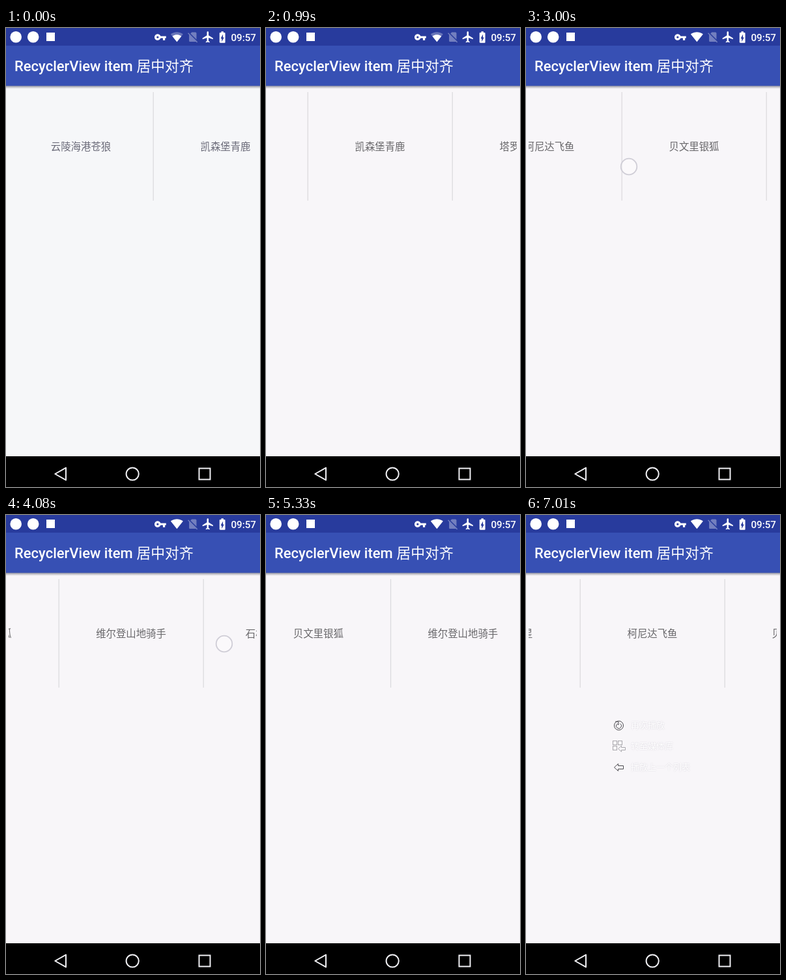
An HTML page with a canvas that plays this animation: 390 by 702 pixels, repeating every 7.11 s.

```html
<!DOCTYPE html>
<html lang="zh-CN">
<head>
<meta charset="utf-8">
<title>RecyclerView item 居中对齐</title>
<style>
  html, body { margin: 0; width: 100%; height: 100%; overflow: hidden; background: #f8f6f9; }
  canvas { display: block; width: 100%; height: 100%; }
</style>
</head>
<body>
<canvas id="stage"></canvas>
<script>
const W = 390, H = 702, LOOP = 7110;
const ITEM = 222, LEFT = 4, RIGHT = 385;
const CJK = '"Noto Sans CJK SC", "Noto Sans CJK", sans-serif';
const TEAMS = ['云陵海港苍狼', '凯森堡青鹿', '塔罗港晨星', '柯尼达飞鱼',
  '贝文里银狐', '维尔登山地骑手', '石桥湾镇雪豹'];

// Scroll moves; touch is the finger's starting point
const MOVES = [
  { start: 300, end: 990, steps: 9, from: 0, to: 162, power: 1.7, touch: [316, 205] },
  { start: 990, end: 1220, steps: 3, from: 162, to: 143, power: 1.7 },
  { start: 1600, end: 2310, steps: 9, from: 143, to: 587, power: 1.68, touch: [325, 205] },
  { start: 2840, end: 3550, steps: 9, from: 587, to: 1031, power: 1.75, touch: [316, 212] },
  { start: 4080, end: 4480, steps: 5, from: 1033, to: 1253, power: 1.7, touch: [335, 197] },
  { start: 4940, end: 5630, steps: 9, from: 1253, to: 809, power: 1.68, touch: [75, 205] },
  { start: 6160, end: 6860, steps: 9, from: 809, to: 587, power: 1.7, touch: [75, 205] }
];

const ICONS = {
  key: 'M12.65 10C11.83 7.67 9.61 6 7 6c-3.31 0-6 2.69-6 6s2.69 6 6 6c2.61 0 4.83-1.67 5.65-4H17v4h4v-4h2v-4H12.65zM7 14c-1.1 0-2-.9-2-2s.9-2 2-2 2 .9 2 2-.9 2-2 2z',
  wifi: 'M12 21.5L23.64 7c-.45-.34-4.93-4-11.64-4C5.28 3 .81 6.66.36 7z',
  wifiLow: 'M3.53 10.95L12 21.5l8.47-10.55C20.04 10.62 16.81 8 12 8c-4.81 0-8.04 2.62-8.47 2.95z',
  noSim: 'M19 5c0-1.1-.9-2-2-2h-7L7.66 5.34 19 16.68zM3.65 3.88L2.38 5.15 5 7.77V19c0 1.1.9 2 2 2h10c.35 0 .67-.1.96-.26l1.88 1.88 1.27-1.27z',
  plane: 'M21 16v-2l-8-5V3.5c0-.83-.67-1.5-1.5-1.5S10 2.67 10 3.5V9l-8 5v2l8-2.5V19l-2 1.5V22l3.5-1 3.5 1v-1.5L13 19v-5.5z',
  battery: 'M15.67 4H14V2h-4v2H8.33C7.6 4 7 4.6 7 5.33v15.33C7 21.4 7.6 22 8.33 22h7.33c.74 0 1.34-.6 1.34-1.33V5.33C17 4.6 16.4 4 15.67 4zM11 20v-5.5H9L13 7v5.5h2z'
};
for (const name in ICONS) ICONS[name] = new Path2D(ICONS[name]);

const canvas = document.getElementById('stage');
const ctx = canvas.getContext('2d');
const ratio = window.devicePixelRatio || 1;
canvas.width = W * ratio;
canvas.height = H * ratio;

function box(x, y, w, h, color) {
  ctx.fillStyle = color;
  ctx.fillRect(x, y, w, h);
}

function text(str, x, y, font, color, align = 'left') {
  ctx.font = font;
  ctx.fillStyle = color;
  ctx.textAlign = align;
  ctx.fillText(str, x, y);
}

function disc(x, y, r) {
  ctx.beginPath();
  ctx.arc(x, y, r, 0, Math.PI * 2);
}

function stroke(path, color, width) {
  ctx.strokeStyle = color;
  ctx.lineWidth = width;
  ctx.stroke(new Path2D(path));
}

// Icons sit on a 24-unit grid, centred on x, y
function icon(name, x, y, alpha = 1, scale = 0.81) {
  ctx.save();
  ctx.translate(x, y);
  ctx.scale(scale, scale);
  ctx.translate(-12, -12);
  ctx.globalAlpha = alpha;
  ctx.fillStyle = '#fff';
  ctx.fill(ICONS[name]);
  ctx.restore();
}

function poseAt(t) {
  let scroll = 0, touch = null;
  for (const m of MOVES) {
    if (t < m.start) break;
    const step = Math.floor((t - m.start) / ((m.end - m.start) / m.steps) + 1e-6);
    const p = Math.min(1, step / m.steps);
    const moved = (m.to - m.from) * (1 - (1 - p) ** m.power);
    scroll = m.from + moved;
    touch = m.touch && step < 3 ? [m.touch[0] - moved, m.touch[1]] : null;
  }
  return { scroll, touch };
}

function drawList(scroll, early) {
  const left = early ? 0 : LEFT, right = early ? W : RIGHT;
  ctx.save();
  ctx.beginPath();
  ctx.rect(left, 90, right - left, 200);
  ctx.clip();
  TEAMS.forEach((team, i) => {
    const x = LEFT + ITEM * i - scroll;
    text(team, x + ITEM / 2, 186.5, '15.4px ' + CJK, early ? '#6b6b79' : '#69686b', 'center');
    box(x + ITEM - 0.4, 98, 1.2, 166, '#dad9dd');
  });
  ctx.restore();
}

function drawTouch([x, y]) {
  disc(x, y, 12.3);
  ctx.fillStyle = 'rgba(255,255,255,.4)';
  ctx.fill();
  ctx.strokeStyle = '#cfcdd6';
  ctx.lineWidth = 1.8;
  ctx.stroke();
}

function drawBars(t) {
  const shade = ctx.createLinearGradient(0, 88.5, 0, 93);
  shade.addColorStop(0, 'rgba(50,50,65,.46)');
  shade.addColorStop(1, 'rgba(50,50,65,0)');
  box(0, 88, W, 5, shade);
  box(0, 0, W, 27, '#283b9d');
  box(0, 27, W, 61.5, '#3750b4');
  text('RecyclerView item', 13, 66, '500 22px Roboto, sans-serif', '#fff');
  text('居中对齐', 200.5, 66, '21.8px ' + CJK, '#fff');

  ctx.fillStyle = '#fff';
  for (const x of [15.2, 41.7]) { disc(x, 13.8, 8.8); ctx.fill(); }
  box(62, 7, 13, 13, '#fff');
  icon('key', 236.9, 14);
  const weak = t < 1680;
  icon('wifi', 262.4, 13.6, weak ? 0.3 : 1);
  if (weak) icon('wifiLow', 262.4, 13.6);
  icon('noSim', 286.8, 13.8, 0.35);
  icon('plane', 310.2, 13.8, 1, 0.85);
  icon('battery', 332.2, 14, 1, 0.88);
  text('09:57', 384, 19.5, '500 15.2px Roboto, sans-serif', '#fff', 'right');

  box(0, 655, W, 47, '#000');
  ctx.lineJoin = 'round';
  stroke('M75.3 682L92 672.6V691.4Z', '#f0f0f4', 2);
  disc(194.2, 682, 9.6);
  ctx.stroke();
  ctx.lineJoin = 'miter';
  ctx.strokeRect(296.5, 673.5, 17, 17);
}

function drawMenu(alpha) {
  ctx.save();
  ctx.globalAlpha = alpha;
  const dark = '#4c4b50', grey = '#a9a8ac';
  disc(142.5, 322, 7);
  ctx.strokeStyle = dark;
  ctx.lineWidth = 1;
  ctx.stroke();
  ctx.beginPath();
  ctx.arc(142.5, 322.5, 4, -1, 3.8);
  ctx.stroke();
  stroke('M137 316H142V321L139.5 319', dark, 1);

  ctx.strokeStyle = grey;
  for (const [x, y] of [[133.5, 345.5], [141.5, 345.5], [133.5, 353.5]]) {
    ctx.strokeRect(x, y, 6, 6);
  }
  stroke('M141.5 357.5L146.5 353V355.5H152.5V359.5H146.5V362Z', grey, 1);
  stroke('M135.5 386L141.5 380.5V383.5H149.5V388.5H141.5V391.5Z', dark, 1);

  ctx.shadowColor = 'rgba(90,80,110,.25)';
  ctx.shadowBlur = 2 * ratio;
  ['再次播放', '转至媒体库', '播放上一个列表'].forEach((label, i) =>
    text(label, 161, 326 + 32 * i, '13px ' + CJK, '#fff'));
  ctx.restore();
}

function draw(t) {
  const { scroll, touch } = poseAt(t);
  const early = t < 300;
  ctx.setTransform(ratio, 0, 0, ratio, 0, 0);
  box(0, 0, W, H, early ? '#f6f7f9' : '#f8f6f9');
  drawList(scroll, early);
  if (touch) drawTouch(touch);
  drawBars(t);
  if (t >= 6940) drawMenu(t < 7010 ? 0.5 : 1);
}

const begin = performance.now();
function tick() {
  draw((performance.now() - begin) % LOOP);
  requestAnimationFrame(tick);
}
tick();
</script>
</body>
</html>
```
